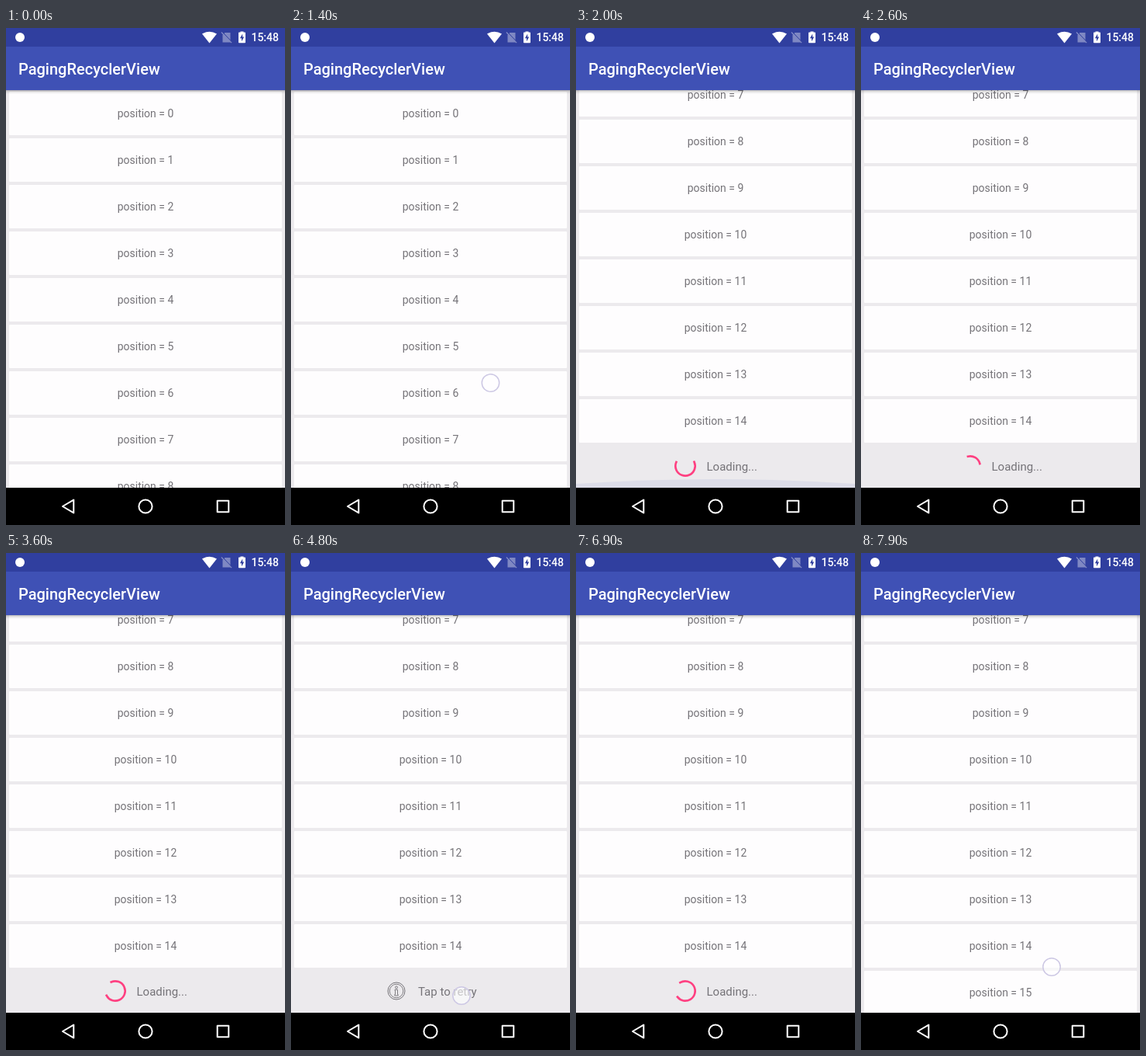
Write an HTML page that moves like this. It is 360x640 px and loops after 8000 ms.

```html
<!DOCTYPE html>
<html lang="en">
<head>
<meta charset="utf-8">
<title>Paging list</title>
<style>
  html, body { margin: 0; width: 100%; height: 100%; overflow: hidden; background: #000; }
  svg { display: block; width: 100vw; height: 100vh; }
  text { font-family: Roboto, Inter, sans-serif; fill: #757378; }
  .item { font-size: 14px; text-anchor: middle; }
  .foot { font-size: 15px; }
  .title { font-size: 20px; font-weight: 500; fill: #fff; }
  .clock { font-size: 14px; font-weight: 500; fill: #fff; }
</style>
</head>
<body>
<svg viewBox="0 0 360 640">
  <defs>
    <linearGradient id="shade" x1="0" y1="0" x2="0" y2="1">
      <stop offset="0" stop-color="#000" stop-opacity=".28"/>
      <stop offset=".4" stop-color="#000" stop-opacity=".1"/>
      <stop offset="1" stop-color="#000" stop-opacity="0"/>
    </linearGradient>
  </defs>
  <rect width="360" height="640" fill="#eceaed"/>

  <g id="list">
    <g id="cards"></g>
    <g id="loading">
      <circle id="spinner" cx="141" cy="1008" r="12.67" pathLength="360" fill="none"
        stroke="#ff4081" stroke-width="2.67" stroke-linecap="square"/>
      <text class="foot" x="168.5" y="1014">Loading...</text>
    </g>
    <g id="retry">
      <g transform="translate(136 1008)" fill="none" stroke="#757378">
        <circle r="11" stroke-width="1"/>
        <circle r="8.8" stroke-width=".9"/>
        <circle cy="-4.6" r="1.5" stroke-width=".9"/>
        <path d="M-2 -1.7H1.5V4.6H2.2V6H-2.2V4.6H-1.5V-.5H-2Z" stroke-width=".9"/>
      </g>
      <text class="foot" x="164" y="1014">Tap to retry</text>
    </g>
  </g>

  <path id="glow" fill="#3f51b5"/>
  <circle id="touch" r="11.2" fill="#fff" fill-opacity=".6" stroke="#cdc8e4" stroke-width="1.5"/>

  <rect y="80" width="360" height="5" fill="url(#shade)"/>
  <rect y="24" width="360" height="56" fill="#3f51b5"/>
  <rect width="360" height="24" fill="#303f9f"/>
  <text class="title" x="16" y="59.5">PagingRecyclerView</text>

  <g fill="#fff">
    <circle cx="18" cy="12" r="6"/>
    <path d="M262.5 19.5L253 7.6Q262.5 1.8 272 7.6Z"/>
    <g opacity=".38">
      <path d="M282.5 6H289.5V18.5H279.5V9Z"/>
      <path d="M278 5.5L291 19" stroke="#fff" stroke-width="1.5"/>
    </g>
    <path d="M278.6 4.5L291.6 18" stroke="#303f9f" stroke-width="1"/>
    <path d="M302.5 5.6V4.5H306.5V5.6H308.2Q309 5.6 309 6.4V18.4Q309 19.2 308.2 19.2H300.8Q300 19.2 300 18.4V6.4Q300 5.6 300.8 5.6Z"/>
    <path d="M305.2 7.5L301.9 13.2H304V17.2L307.2 11.4H305.2Z" fill="#303f9f"/>
  </g>
  <text class="clock" x="352" y="17.3" text-anchor="end">15:48</text>

  <rect y="592" width="360" height="48"/>
  <g fill="none" stroke="#fff" stroke-width="2" stroke-linejoin="round">
    <path d="M73 616L87.3 607.6V624.4Z"/>
    <circle cx="180" cy="616" r="8.6"/>
    <rect x="272.7" y="608.7" width="14.6" height="14.6"/>
  </g>
</svg>
<script>
const LOOP = 8000, STEP = 100;
const RETRY_AT = 3700, TAP_END = 4900, LOADED_AT = 7000;
const $ = id => document.getElementById(id);
const show = (el, on) => el.setAttribute('visibility', on ? 'visible' : 'hidden');

// [time, list offset]
const scrolls = [[0, 0], [1500, 50], [1600, 205], [1700, 444]];
// [from, to, x, y]
const touches = [
  [1400, 1500, 257.5, 457], [1500, 1600, 270, 402], [1600, 1700, 300, 246],
  [4800, 4900, 220, 570], [7900, 8000, 246, 533]
];

let cards = '';
for (let i = 0; i < 16; i++) {
  const y = 82 + 60 * i;
  cards += `<g id="card${i}"><rect x="4" y="${y}" width="352" height="56" rx="1" fill="#fefdfe"/>
    <text class="item" x="180" y="${y + 33}">position = ${i}</text></g>`;
}
$('cards').innerHTML = cards;

// Bezier from (0,0) to (1,1), solved for x by bisection
function ease(x, x1, y1, x2, y2) {
  const at = (u, a, b) => 3 * u * (1 - u) ** 2 * a + 3 * u * u * (1 - u) * b + u ** 3;
  let lo = 0, hi = 1;
  for (let i = 0; i < 24; i++) {
    const mid = (lo + hi) / 2;
    if (at(mid, x1, x2) < x) lo = mid; else hi = mid;
  }
  return at(lo, y1, y2);
}

// Indeterminate ring: the head runs first, the tail follows, all of it turning
function spin(ms) {
  show($('spinner'), ms >= 0);
  if (ms < 0) return;
  const f = ms % 1333 / 1333;
  const head = f < 0.5 ? 270 * ease(f * 2, 0.4, 0, 0.2, 1) : 270;
  const tail = f < 0.5 ? 0 : 270 * ease(f * 2 - 1, 0.4, 0, 0.2, 1);
  const turn = 720 * ms / 6665 + 90 * ms / 1333;
  const length = Math.max(head - tail, 0.1);
  $('spinner').setAttribute('stroke-dasharray', `${length} ${360 - length}`);
  $('spinner').setAttribute('transform', `rotate(${turn + tail - 90} 141 1008)`);
}

function drawGlow(t) {
  const on = t >= 1700 && t < 2260;
  show($('glow'), on);
  if (!on) return;
  const k = (1 - (t - 1700) / 560) ** 2;
  const edge = 592 - 23 * k, bend = 592 - 79 * k;
  $('glow').setAttribute('d', `M0 592V${edge}Q180 ${bend} 360 ${edge}V592Z`);
  $('glow').setAttribute('fill-opacity', 0.4 * k);
}

function draw(t) {
  const offset = scrolls.filter(s => s[0] <= t).pop()[1];
  $('list').setAttribute('transform', `translate(0 ${-offset})`);

  const loaded = t >= LOADED_AT;
  const failed = t >= RETRY_AT && t < TAP_END;
  const loading = !loaded && !failed;
  show($('card15'), loaded);
  show($('retry'), failed);
  show($('loading'), loading);
  if (loading) spin(0.96 * (t - (t < RETRY_AT ? 1610 : 4950)));
  else show($('spinner'), false);

  drawGlow(t);
  const touch = touches.find(p => t >= p[0] && t < p[1]);
  show($('touch'), touch);
  if (touch) $('touch').setAttribute('transform', `translate(${touch[2]} ${touch[3]})`);
}

const start = performance.now();
function tick() {
  const t = (performance.now() - start) % LOOP;
  draw(Math.floor(t / STEP) * STEP);
  requestAnimationFrame(tick);
}
tick();
</script>
</body>
</html>
```
